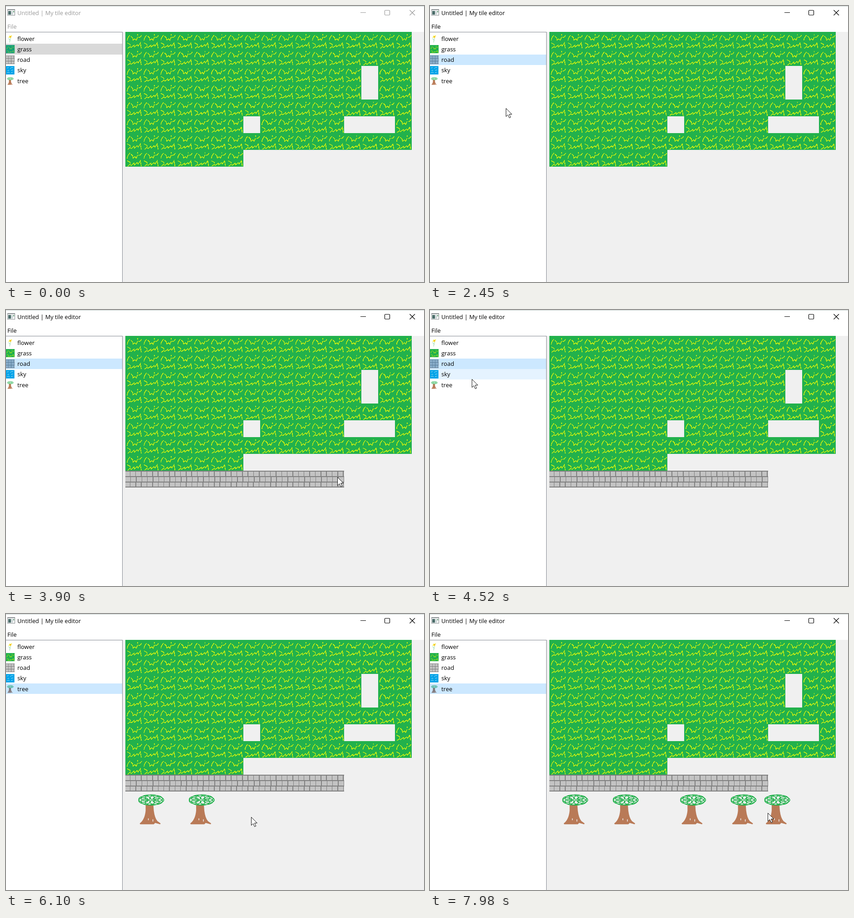
Animation, 921 px wide and 608 px high, one loop 8000 ms. Source, as an HTML page:

```html
<!DOCTYPE html>
<html lang="en">
<head>
<meta charset="utf-8">
<title>Tile editor</title>
<style>
  html, body { margin: 0; width: 100%; height: 100%; overflow: hidden; background: #f0f0f0; }
  svg { display: block; }
  text { font: 13px "Open Sans", "Noto Sans", sans-serif; }
  #chrome { --ink: #999; }
  #chrome.active { --ink: #000; }
  #chrome text { fill: var(--ink); }
  #chrome .title { font-size: 12.8px; }
  #buttons { stroke: var(--ink); fill: none; stroke-width: 1.2; }
  .row { --bar: none; --tint: 0; }
  .row.hover { --bar: #e5f3ff; }
  .row.sel { --bar: #d9d9d9; --tint: .3; --leaf: #18a075; --bark: #81797d; }
  .active .row.sel { --bar: #cce8ff; }
  .bar { fill: var(--bar); }
  .tint { fill: #0078d7; opacity: var(--tint, 0); }
  #rows text { fill: #000; }
  .leaf { fill: none; stroke: var(--leaf, #22b14c); stroke-width: 1.6; }
  .bark { fill: var(--bark, #b97a57); }
  .crisp { shape-rendering: crispEdges; }
</style>
</head>
<body>
<svg width="921" height="608" viewBox="0 0 921 608">
  <defs>
    <g id="grass" class="crisp">
      <rect width="37.1" height="37.1" fill="#22b14c"/>
      <path fill="none" stroke="#c6ee12" stroke-width="1.6" d="M4 19Q4 13 10 7M12 9l4 4 1 5 4-3 3 3 3-7M27 5v3M29 12l4-1 3-4M4 24l6 3 1 3M5 36l5-4 3 2 6-5 1 4 6-5 2 3 5-7 2 12"/>
    </g>
    <g id="road" class="crisp">
      <rect width="37.1" height="37.1" fill="#c3c3c3"/>
    </g>
    <g id="tree">
      <path class="bark" d="M26 29H43L44 42Q46 58 52 65L59 70 58 72 47 69 44 72H14L13 70Q24 62 26 42Z"/>
      <path fill="none" stroke="#f0f0f0" stroke-width="1.5" d="M32 59v4M42 61v5"/>
      <path id="canopy" class="leaf"/>
    </g>
    <g id="flower" fill="none">
      <path stroke="#22b14c" d="M16 36L19 16M19 26L10 18"/>
      <path stroke="#f2e61c" stroke-width="4" d="M12 14L26 6M16 6l6 10"/>
      <circle cx="20" cy="11" r="2" fill="#ff7f27"/>
    </g>
    <g id="sky">
      <rect width="37.1" height="37.1" fill="#00a2e8"/>
      <path fill="none" stroke="#a5e0f5" stroke-width="2" d="M4 9l8-2M18 11l6-4h8M6 19h8M22 19l10-2M4 29l6-2 6 2M22 29l8-2"/>
    </g>
  </defs>

  <rect width="921" height="608" fill="#f0f0f0"/>
  <g id="chrome">
    <path fill="#fff" d="M0 0H921V57H0ZM0 57H256V608H0Z"/>
    <rect width="921" height="1" fill="#c3cfcd"/>
    <g class="crisp">
      <path fill="#8a8f92" d="M3 7H20V21H3Z"/>
      <path fill="#f4f6f6" d="M4 9H19V20H4Z"/>
      <path fill="#4b6d6a" d="M5 11H11V19H5Z"/>
      <path fill="#c9d2d4" d="M12 11H15V19H12Z"/>
      <path fill="#5c9a70" d="M16 11H18V14H16Z"/>
    </g>
    <text class="title" x="25" y="20">Untitled | My tile editor</text>
    <text x="3" y="49.5">File</text>
    <g id="buttons">
      <path d="M781 14.5H793M889.5 9L901 20.5M901 9L889.5 20.5"/>
      <rect x="834.5" y="9.5" width="11" height="10.5" rx="1.5"/>
    </g>
    <g id="rows"></g>
    <path class="crisp" fill="none" stroke="#828790" d="M0 57.5H256.5V608"/>
  </g>
  <g id="tiles"></g>
  <g id="cursor">
    <circle id="press" cx="-.5" r="14" fill="#ece61a" fill-opacity=".65"/>
    <path d="M.5 .5V18.5L4.700 14.700 7.700 21.500 10.700 20.200 7.700 13.500H13.300Z" fill="#fff" stroke="#111"/>
  </g>
</svg>
<script>
const LOOP = 8000, START = 460, STEP = 69;
const CELL = 37.1, LEFT = 263.1, TOP = 57.3, ROW_TOP = 60, ROW_H = 23.25;
const $ = id => document.getElementById(id);

function add(parent, tag, attrs) {
  const el = document.createElementNS("http://www.w3.org/2000/svg", tag);
  for (const k in attrs) el.setAttribute(k, attrs[k]);
  return parent.appendChild(el);
}
function place(id, col, row) {
  const x = LEFT + col * CELL, y = TOP + row * CELL;
  return add($("tiles"), "use", { href: "#" + id, transform: `translate(${x} ${y})` });
}
const show = (el, on) => el.setAttribute("visibility", on ? "visible" : "hidden");

// brick courses, three bricks each, one joint thicker
function mortar(d, width) {
  add($("road"), "path", { d, fill: "none", stroke: "#7f7f7f", "stroke-width": width });
}
for (let r = 0; r < 4; r++) {
  const y = 0.8 + r * 11.8;
  mortar(`M0 ${y}H${CELL}`, 2);
  for (let i = 0; r < 3 && i < 3; i++) {
    const x = 10.3 + (r % 2) * 1.2 + i * CELL / 3;
    mortar(`M${x} ${y}v11.8`, i === (r ? 1 : 2) ? 2 : 1.3);
  }
}

// looping scribble for the tree top
const scribble = Array.from({ length: 300 }, (_, i) => {
  const a = i / 300 * 4 * Math.PI, b = a * 5.5;
  const x = 38 + 18 * Math.cos(a) + 10 * Math.cos(b);
  const y = 18.5 + 6.5 * Math.sin(a) + 5 * Math.sin(b);
  return x.toFixed(1) + " " + y.toFixed(1);
});
$("canopy").setAttribute("d", "M" + scribble.join("L") + "Z");

const rows = ["flower", "grass", "road", "sky", "tree"].map((name, i) => {
  const y = ROW_TOP + i * ROW_H, scale = name === "tree" ? 0.25 : 0.5;
  const g = add($("rows"), "g", { class: "row" });
  add(g, "rect", { class: "bar crisp", y, width: 256, height: ROW_H });
  add(g, "use", { href: "#" + name, transform: `translate(0 ${y + 2.5}) scale(${scale})` });
  if (name === "grass" || name === "road")
    add(g, "rect", { class: "tint", y: y + 2.5, width: CELL / 2, height: CELL / 2 });
  add(g, "text", { x: 25, y: y + 16.5 }).textContent = name;
  return g;
});

const isHole = (c, r) =>
  (c === 14 && (r === 2 || r === 3)) ||
  (r === 5 && (c === 7 || (c > 12 && c < 16))) ||
  (r === 7 && c > 6);
for (let r = 0; r < 8; r++)
  for (let c = 0; c < 17; c++)
    if (!isHole(c, r)) place("grass", c, r);

const road = Array.from({ length: 13 }, (_, c) => place("road", c, 8));

const ROAD_CLICK = 2045, DRAG = 2750, DROP = 3900, TREE_CLICK = 4700, HOLD = 80;

// column and time of each planted tree
const trees = [[1, 5500], [4, 5850], [8, 6380], [11, 6670], [13, 6890]]
  .map(([col, at]) => ({ at, x: LEFT + (col + 0.58) * CELL, el: place("tree", col - 0.5, 9) }));

// pointer stops: time, x, y, rest
const stops = [
  [START, 808, 598], [980, 312, 292], [1220, 338, 328], [1495, 316, 344],
  [1910, 88, 115, 310], [2790, 274, 376], [3289, 550, 376], [3850, 730, 368, 100],
  [4531, 92, 152], [TREE_CLICK, 94, 164, 190], [5428, 326, 434],
  [6187, 579, 447, 190], [7400, 875, 481], [7981, 744, 438],
  ...trees.map(p => [p.at, p.x, 447, HOLD])
].sort((a, b) => a[0] - b[0]);

const presses = [[ROAD_CLICK, 2190], [DRAG, DROP], [TREE_CLICK, 4830],
  ...trees.map(p => [p.at, p.at + HOLD])];

function pointer(t) {
  const next = stops.findIndex(s => s[0] > t);
  const [t0, x0, y0, rest = 0] = stops.at(next < 0 ? -1 : Math.max(0, next - 1));
  const [t1, x1, y1] = stops.at(next);
  const k = Math.min(1, Math.max(0, (t - t0 - rest) / (t1 - t0 - rest || 1)));
  return [x0 + (x1 - x0) * k, y0 + (y1 - y0) * k];
}

function draw(time) {
  const t = START + Math.floor((time + 18 - START) / STEP) * STEP;
  const [x, y] = pointer(t);
  const visible = t >= START;
  $("chrome").setAttribute("class", t >= ROAD_CLICK ? "active" : "");

  const sel = t < ROAD_CLICK ? 1 : t < TREE_CLICK ? 2 : 4;
  const hover = visible && x < 256 ? Math.floor((y - ROW_TOP) / ROW_H) : -1;
  rows.forEach((g, i) =>
    g.setAttribute("class", "row" + (i === sel ? " sel" : i === hover ? " hover" : "")));

  const paved = t < DRAG ? 0 : Math.floor((pointer(Math.min(t, DROP))[0] - LEFT) / CELL) + 1;
  road.forEach((el, i) => show(el, i < paved));
  trees.forEach(p => show(p.el, t >= p.at));

  $("cursor").setAttribute("transform", `translate(${Math.round(x)} ${Math.round(y)})`);
  $("cursor").style.display = visible ? "" : "none";
  show($("press"), presses.some(([a, b]) => t >= a && t < b));
}

let origin;
function tick(now) {
  origin ??= now;
  draw((now - origin) % LOOP);
  requestAnimationFrame(tick);
}
draw(0);
requestAnimationFrame(tick);
</script>
</body>
</html>
```
